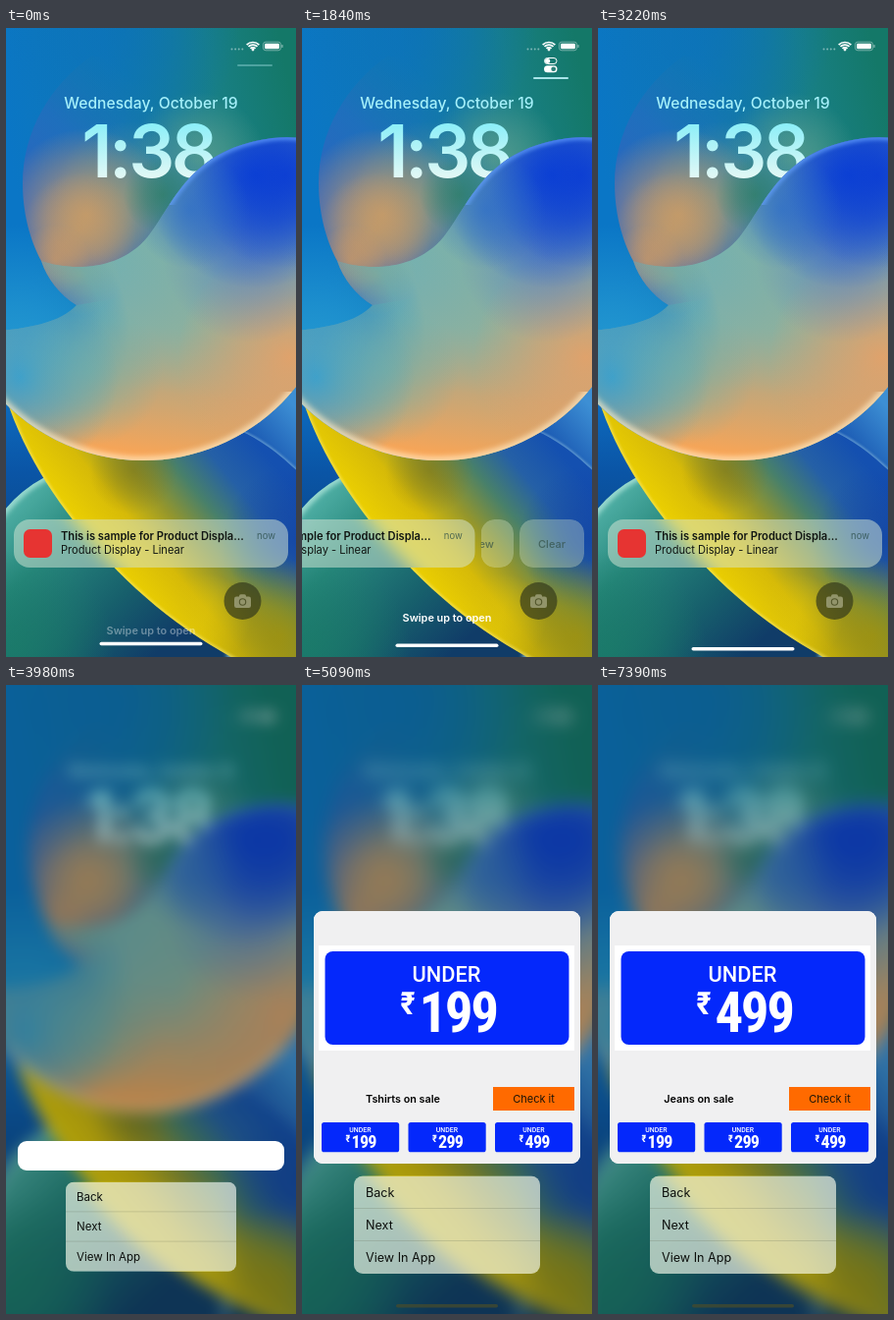
Recreate the animation shown at these times as an HTML page with a canvas. Size 296 by 640 pixels, loop 8000 ms.

```html
<!DOCTYPE html>
<html lang="en">
<head>
<meta charset="utf-8">
<title>Lock screen notification</title>
<style>
html, body { margin: 0; width: 296px; height: 640px; overflow: hidden; background: #0a6bb4; }
canvas { display: block; }
</style>
</head>
<body>
<canvas id="stage" width="296" height="640"></canvas>
<script>
const W = 296, H = 640, PAD = 40, LOOP = 8000;
const UI = 'Inter, "Noto Sans", sans-serif';
const NUM = '"Roboto Condensed", "Noto Sans", sans-serif';
const ctx = document.getElementById('stage').getContext('2d');

function layer() {
  const c = document.createElement('canvas');
  c.width = W + PAD * 2;
  c.height = H + PAD * 2;
  const g = c.getContext('2d');
  g.translate(PAD, PAD);
  return g;
}

// Eased value at time t from [time, value] keys.
function at(t, ...keys) {
  if (t <= keys[0][0]) return keys[0][1];
  for (let i = 1; i < keys.length; i++) {
    const [t0, a] = keys[i - 1], [t1, b] = keys[i];
    if (t < t1) {
      const p = (t - t0) / (t1 - t0);
      return a + (b - a) * p * p * (3 - 2 * p);
    }
  }
  return keys[keys.length - 1][1];
}

function text(g, s, x, y, size, weight, color, align = 'left', family = UI) {
  g.font = `${weight} ${size}px ${family}`;
  g.textAlign = align;
  g.fillStyle = color;
  g.fillText(s, x, y);
}

function box(g, x, y, w, h, r, fill) {
  g.beginPath();
  g.roundRect(x, y, w, h, r);
  if (fill) { g.fillStyle = fill; g.fill(); }
}

function linear(g, x0, y0, x1, y1, ...stops) {
  const f = g.createLinearGradient(x0, y0, x1, y1);
  stops.forEach(([p, c]) => f.addColorStop(p, c));
  return f;
}

function radial(g, x, y, r0, r1, ...stops) {
  const f = g.createRadialGradient(x, y, r0, x, y, r1);
  stops.forEach(([p, c]) => f.addColorStop(p, c));
  return f;
}

function flood(g, fill) {
  g.fillStyle = fill;
  g.fillRect(-PAD, -PAD, W + PAD * 2, H + PAD * 2);
}

function glow(g, x, y, r, rgb, a = 1) {
  flood(g, radial(g, x, y, 0, r, [0, `rgba(${rgb},${a})`], [0.45, `rgba(${rgb},${a * 0.62})`], [1, `rgba(${rgb},0)`]));
}

function within(g, path, draw) {
  g.save();
  g.clip(path);
  draw();
  g.restore();
}

// Soft light along a path, inside it.
function rim(g, path, color, width, blur) {
  within(g, path, () => {
    g.filter = `blur(${blur}px)`;
    g.strokeStyle = color;
    g.lineWidth = width;
    g.stroke(path);
  });
}

function drawBack(g) {
  flood(g, linear(g, 0, 120, 290, 60, [0, '#0a76c6'], [0.4, '#0f78b4'], [0.75, '#187f84'], [1, '#147868']));
  glow(g, 120, 0, 120, '10,112,190', 0.6);
  glow(g, 10, 350, 150, '45,165,212', 0.85);
  glow(g, 195, 135, 70, '105,165,140', 0.75);

  const bubble = new Path2D('M88 28C45 58 17 105 17 158C17 195 28 222 36 237C42 255 55 272 72 282L200 260L250 60Z');
  within(g, bubble, () => {
    flood(g, linear(g, 17, 170, 125, 50, [0, 'rgba(48,100,190,.95)'], [0.5, 'rgba(38,108,188,.7)'], [1, 'rgba(30,120,160,0)']));
    glow(g, 125, 170, 75, '95,155,140', 0.7);
    glow(g, 82, 190, 88, '186,152,112', 1);
    glow(g, 75, 205, 58, '202,156,100', 0.7);
    glow(g, 50, 236, 36, '222,158,90', 0.6);
    glow(g, 160, 170, 40, '45,125,100', 0.75);
  });
}

function drawBottom(g) {
  g.fillStyle = linear(g, 0, 350, 0, 640, [0, '#0f74c8'], [0.35, '#0a55a6'], [1, '#0d3764']);
  g.fillRect(-PAD, 350, W + PAD * 2, H + PAD - 350);

  const ball = new Path2D('M-30 572A130 130 0 0 1 230 572V690H-30Z');
  within(g, ball, () => {
    flood(g, linear(g, 10, 460, 165, 625, [0, '#58b8ae'], [0.35, '#27877c'], [0.7, '#17606c'], [1, '#103c68']));
    glow(g, 10, 630, 100, '26,124,104', 0.8);
  });
  rim(g, ball, 'rgba(185,235,225,.75)', 8, 2.5);

  const band = new Path2D('M-7 352C9 416 42 471 85 521C135 579 187 620 257 654L340 690V350Z');
  within(g, band, () => {
    flood(g, linear(g, 82, 523, 234, 396, [0, '#eed200'], [0.25, '#d6ba08'], [0.42, '#94962c'],
      [0.6, '#48806a'], [0.78, '#2560a6'], [1, '#1450b0']));
    glow(g, 130, 450, 45, '120,112,20', 0.5);
    glow(g, 296, 520, 75, '16,64,165', 0.7);
    glow(g, 280, 620, 80, '158,146,16', 0.9);
    glow(g, 205, 600, 45, '220,195,10', 0.5);
  });
  rim(g, band, 'rgba(255,240,130,.6)', 3, 1.5);

  const shoulder = new Path2D('M205 400C250 408 280 428 345 500V350H205Z');
  within(g, shoulder, () => {
    flood(g, linear(g, 225, 440, 290, 380, [0, '#2f6fb8'], [0.4, '#1c5cb4'], [1, '#3d8fd4']));
  });
  rim(g, shoulder, 'rgba(140,190,225,.6)', 3, 1.2);
}

const FRONT = new Path2D('M36 237C62 246 114 250 145 212C171 180 186 123 272 112C298 109 322 114 345 124' +
  'L340 240A200 200 0 0 1 140 440A200 200 0 0 1 -20 360L-60 310C20 310 55 300 72 282C55 272 42 255 36 237Z');

function drawFront(g) {
  within(g, FRONT, () => {
    flood(g, linear(g, 0, 310, 0, 350, [0, 'rgba(48,162,210,0)'], [1, 'rgba(48,162,210,1)']));
    flood(g, radial(g, -5, 310, 72, 190, [0, 'rgba(70,172,205,0)'], [0.28, 'rgba(82,176,194,.85)'], [0.5, '#76b6b0'], [1, '#84b6a4']));
    flood(g, linear(g, 205, 105, 165, 440, [0, 'rgba(20,75,210,0)'], [0.3, 'rgba(90,150,190,.1)'],
      [0.6, 'rgba(150,168,152,.4)'], [0.8, 'rgba(226,160,100,.7)'], [1, 'rgba(250,165,85,1)']));
    glow(g, 15, 355, 100, '50,160,210', 0.9);
    glow(g, 85, 350, 75, '105,176,172', 0.6);
    glow(g, 290, 335, 115, '236,160,100', 0.85);
    glow(g, 250, 230, 90, '95,130,190', 0.75);
    glow(g, 255, 150, 115, '14,70,212', 1);
    glow(g, 285, 150, 95, '10,60,212', 0.9);
    glow(g, 188, 185, 60, '45,110,200', 0.7);
    glow(g, 75, 250, 42, '150,175,135', 0.45);
  });
  const lower = new Path2D('M-40 370H340V450H-40Z');
  const upper = new Path2D('M165 90H345V180H165Z');
  within(g, lower, () => rim(g, FRONT, 'rgba(255,240,205,.9)', 6, 3));
  within(g, upper, () => rim(g, FRONT, 'rgba(100,160,255,.8)', 5, 2));
}

function drawStatus(g) {
  for (let i = 0; i < 4; i++) box(g, 229.5 + i * 3.6, 20.5, 2, 2, 1, 'rgba(255,255,255,.45)');
  g.strokeStyle = '#fff';
  g.lineWidth = 1.7;
  [3.6, 6.4, 9].forEach(r => {
    g.beginPath();
    g.arc(252, 23.5, r, -Math.PI * 0.75, -Math.PI * 0.25);
    g.stroke();
  });
  g.beginPath();
  g.arc(252, 22, 1.4, 0, 7);
  g.fillStyle = '#fff';
  g.fill();
  g.lineWidth = 0.8;
  g.strokeStyle = 'rgba(255,255,255,.5)';
  box(g, 262.5, 14.2, 18, 8.6, 2.6);
  g.stroke();
  box(g, 264, 15.7, 15, 5.6, 1.4, '#fff');
  box(g, 281.4, 17, 1.2, 3, 0.6, 'rgba(255,255,255,.5)');
}

const wall = layer();
drawBack(wall);
drawBottom(wall);
text(wall, 'Wednesday, October 19', 148, 82, 15.65, 500, '#a5f0fa', 'center');
wall.letterSpacing = '-3.5px';
text(wall, '1:38', 145, 152, 74, 600, linear(wall, 0, 98, 0, 152, [0, '#8deff8'], [1, '#e2f8f5']), 'center');
wall.letterSpacing = '0px';
drawFront(wall);
drawStatus(wall);

const soft = layer();
soft.filter = 'blur(9px)';
soft.drawImage(wall.canvas, -PAD, -PAD);

// Frosted panel over the blurred wallpaper.
function glass(x, y, w, h, r, tint) {
  ctx.save();
  box(ctx, x, y, w, h, r);
  ctx.clip();
  ctx.drawImage(soft.canvas, -PAD, -PAD);
  ctx.fillStyle = tint;
  ctx.fillRect(x, y, w, h);
  ctx.restore();
}

function drawAction(label, x0, x1, fade) {
  if (x1 - x0 < 2) return;
  ctx.save();
  ctx.globalAlpha *= fade;
  box(ctx, x0, 500, x1 - x0, 49, Math.min(14, (x1 - x0) / 2));
  ctx.clip();
  glass(x0, 500, x1 - x0, 49, 14, 'rgba(225,235,205,.32)');
  text(ctx, label, x1 - 33, 528.5, 11, 500, 'rgba(50,80,70,.7)', 'center');
  ctx.restore();
}

function drawNotice(t) {
  const fade = at(t, [3480, 1], [3750, 0]);
  if (!fade) return;
  const dx = at(t, [1250, 0], [2105, -144], [2420, -144], [3000, 2], [3300, 2], [3430, 0]);
  const grow = at(t, [3330, 1], [3650, 0.97]);
  ctx.save();
  ctx.globalAlpha = fade;
  ctx.translate(148, 524);
  ctx.scale(grow, grow);
  ctx.translate(-148, -524);
  const edge = 288 + dx + 6;
  if (dx < -6) {
    drawAction('Clear', Math.max(222, edge), 288, Math.min(1, -dx / 60));
    drawAction('View', Math.max(150, edge), 216, Math.min(1, (-dx - 66) / 40));
  }
  glass(8 + dx, 500, 280, 49, 16, 'rgba(218,234,216,.5)');
  box(ctx, 18 + dx, 510, 29, 29, 6.5, '#e63432');
  text(ctx, 'This is sample for Product Displa...', 56 + dx, 521, 11.15, 600, '#101512');
  text(ctx, 'Product Display - Linear', 56 + dx, 535, 11.05, 400, '#101512');
  text(ctx, 'now', 275 + dx, 519.5, 9.5, 400, 'rgba(40,75,70,.75)', 'right');
  ctx.restore();
}

function drawCamera() {
  ctx.beginPath();
  ctx.arc(241.5, 583, 19, 0, 7);
  ctx.fillStyle = 'rgba(52,58,28,.7)';
  ctx.fill();
  box(ctx, 233, 578.5, 17, 11.5, 2.2, '#92946a');
  box(ctx, 238, 576.3, 7, 4, 1.6, '#92946a');
  ctx.strokeStyle = '#52562c';
  ctx.lineWidth = 1.1;
  ctx.beginPath();
  ctx.arc(241.5, 584, 3.2, 0, 7);
  ctx.stroke();
}

function drawHints(t, shown) {
  const a = at(t, [0, 0.38], [500, 1], [2200, 1], [2750, 0]);
  const rise = at(t, [0, 0], [600, 1], [2200, 1], [2750, 0]);
  ctx.save();
  ctx.globalAlpha = a * shown;
  text(ctx, 'Swipe up to open', 148, 617 - 13 * rise, 10.9, 600, '#fff', 'center');
  box(ctx, 236, 37 + 13 * rise, 36, 2, 1, '#a8e4e8');
  ctx.globalAlpha = rise * shown;
  ctx.lineWidth = 1;
  ctx.strokeStyle = '#fff';
  box(ctx, 247.5, 30.5, 12.5, 6, 3);
  ctx.stroke();
  box(ctx, 248, 31, 5.2, 5, 2.6, '#fff');
  box(ctx, 247, 38.2, 13.5, 7, 3.5, '#fff');
  box(ctx, 254.3, 39.4, 4.8, 4.6, 2.4, '#2a8078');
  ctx.globalAlpha = shown;
  const y = at(t, [0, 624.7], [500, 624], [1840, 626.5], [2700, 630]);
  box(ctx, 95.5, y, 105, 3.6, 1.8, '#fff');
  ctx.restore();
}

function drawBanner(x, y, k, price) {
  ctx.save();
  ctx.translate(x, y);
  ctx.scale(k, k);
  box(ctx, 0, 0, 249, 95, 8, '#0428fb');
  text(ctx, 'UNDER', 124, 31, 21.8, 500, '#fff', 'center', 'Roboto, sans-serif');
  ctx.letterSpacing = '-2.5px';
  ctx.font = `700 57px ${NUM}`;
  const left = 126 - (ctx.measureText(price).width + 19) / 2;
  text(ctx, price, left + 19, 82, 57, 700, '#fff', 'left', NUM);
  text(ctx, '₹', left, 64, 32, 700, '#fff', 'left', NUM);
  ctx.restore();
}

function drawCard(t) {
  const fade = at(t, [3620, 0], [3820, 1]);
  if (!fade) return;
  const top = at(t, [3650, 500], [3980, 464]) + at(t, [3980, 0], [4300, -168], [4640, -234]);
  const bottom = at(t, [3650, 549], [3980, 494], [4300, 420], [4700, 487]);
  const show = at(t, [4120, 0], [4300, 0.34], [4700, 1]);
  const rest = at(t, [4350, 0], [4750, 1]);
  const [price, item] = t < 6300 ? ['199', 'Tshirts'] : t < 7390 ? ['299', 'Shirts'] : ['499', 'Jeans'];
  ctx.save();
  ctx.globalAlpha = fade;
  box(ctx, 12, top, 272, bottom - top, 9, '#fff');
  ctx.clip();
  ctx.globalAlpha = rest;
  ctx.fillStyle = '#f0f0f1';
  ctx.fillRect(12, top, 272, bottom - top);
  ctx.translate(0, top - 230);
  ctx.fillStyle = '#fff';
  ctx.fillRect(17, 265, 261, 107);
  ctx.globalAlpha = show;
  drawBanner(23.5, 271, 1, price);
  ctx.globalAlpha = rest;
  text(ctx, item + ' on sale', 103, 425, 10.8, 600, '#000', 'center');
  ctx.fillStyle = '#ff6a00';
  ctx.fillRect(195, 409, 83, 24);
  text(ctx, 'Check it', 236.5, 425, 11, 400, '#1c1408', 'center');
  ['199', '299', '499'].forEach((p, i) => drawBanner(20 + i * 88.5, 445, 0.318, p));
  ctx.restore();
}

function drawMenu(t) {
  const fade = at(t, [3640, 0], [3860, 1]);
  if (!fade) return;
  const k = at(t, [3640, 0.55], [3980, 0.916], [4200, 1]);
  ctx.save();
  ctx.globalAlpha = fade;
  ctx.translate(148, at(t, [3640, 545], [3980, 551], [4200, 549]));
  ctx.scale(k, k);
  ctx.translate(-148, -549);
  glass(53, 499.5, 190, 99.5, 9, 'rgba(220,226,212,.74)');
  ctx.fillStyle = 'rgba(90,100,80,.22)';
  ctx.fillRect(53, 532, 190, 1);
  ctx.fillRect(53, 565, 190, 1);
  ['Back', 'Next', 'View In App'].forEach((s, i) => text(ctx, s, 65, 520.5 + i * 33.3, 12.6, 400, '#0c0f0c'));
  ctx.restore();
}

function drawScene(t) {
  const p = at(t, [3400, 0], [3900, 1]);
  const k = 1 - 0.045 * p;
  const blur = 7 * p + at(t, [3900, 0], [4300, 2]);
  ctx.save();
  if (p) ctx.filter = `blur(${blur}px)`;
  ctx.translate(148, 320);
  ctx.scale(k, k);
  ctx.drawImage(wall.canvas, -148 - PAD, -320 - PAD);
  ctx.restore();
  ctx.fillStyle = `rgba(8,30,30,${0.25 * p})`;
  ctx.fillRect(0, 0, W, H);

  ctx.globalAlpha = 1 - p;
  drawCamera();
  ctx.globalAlpha = 1;
  drawHints(t, 1 - p);
  drawNotice(t);
  drawMenu(t);
  drawCard(t);
  ctx.globalAlpha = at(t, [4600, 0], [5000, 1]);
  box(ctx, 96, 630, 104, 3.6, 1.8, 'rgba(70,75,45,.75)');
  ctx.globalAlpha = 1;
}

const start = performance.now();
function tick() {
  drawScene((performance.now() - start) % LOOP);
  requestAnimationFrame(tick);
}
tick();
</script>
</body>
</html>
```
